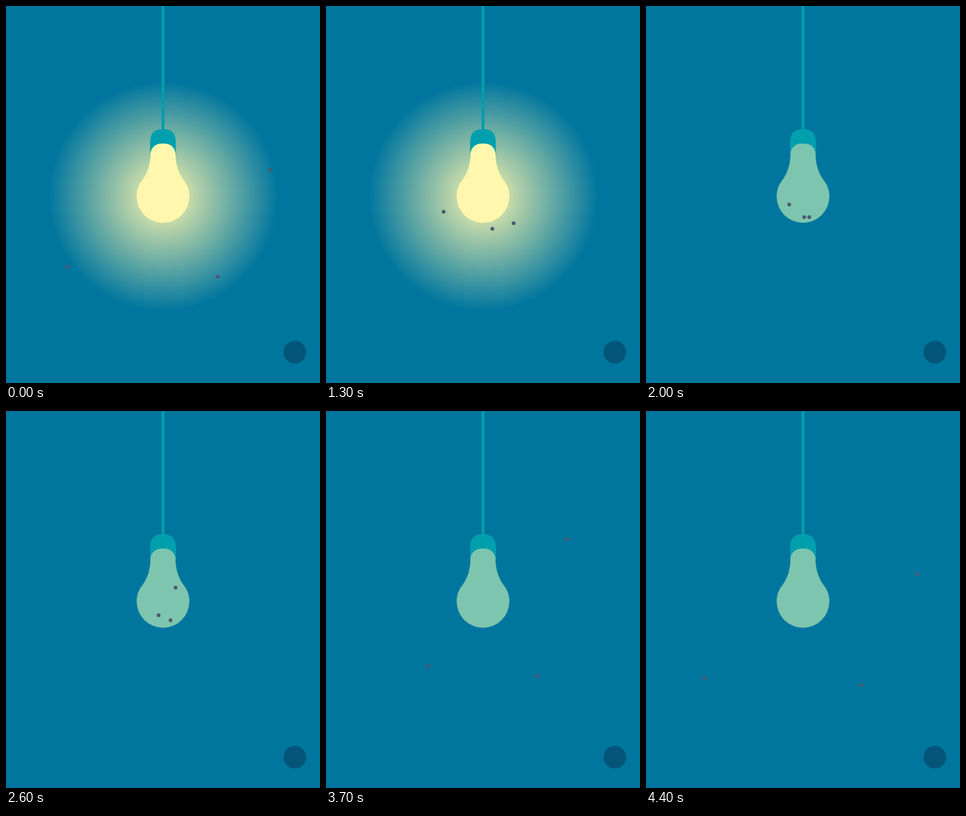
These frames come from a looping animation (500 px wide and 600 px high, 4500 ms). An HTML page:

```html
<!DOCTYPE html>
<html lang="en">
<head>
<meta charset="utf-8">
<title>Flies and a light bulb</title>
<style>
  html, body { margin: 0; width: 100%; height: 100%; overflow: hidden; background: #00769e; }
  svg { display: block; width: 100%; height: 100%; }
</style>
</head>
<body>
<svg viewBox="0 0 500 600">
  <defs>
    <radialGradient id="halo">
      <stop offset="0" stop-color="#fff7ad"/>
      <stop offset="1" stop-color="#fff7ad" stop-opacity="0"/>
    </radialGradient>
  </defs>
  <rect width="500" height="600" fill="#00769e"/>
  <circle id="glow" cx="250.5" cy="303" r="183" fill="url(#halo)"/>
  <g fill="#009fae">
    <rect x="247.7" width="4.6" height="199"/>
    <path d="M229.5 236V218C229.5 202 236 196 250 196S270.5 202 270.5 218V236Z"/>
  </g>
  <path id="bulb" d="M230 236A17 17 0 0 1 247 219H253A17 17 0 0 1 270 236C270 252 275 266 282 276C288 283 292 292 292 303A42 42 0 0 1 208 303C208 292 212 283 218 276C225 266 230 252 230 236Z"/>
  <g id="flies" fill="#4d5870"></g>
  <circle cx="460" cy="551" r="18" fill="#03557a"/>
</svg>
<script>
const STEP = 100, STEPS = 45, LIGHTS_OUT = 20;

// Each fly loops smoothly: far away, approach, touch, darkness, crawl, leave, turn back
const keySteps = [0, 7, 19, 20, 26, 37, 44];
const routes = [
  "98,415 148,352 225,311 228,316 243,325 163,406 93,425",
  "337,431 280,369 256,346 252,336 262,333 336,422 342,436",
  "421,261 340,327 264,352 260,336 270,281 384,204 432,260"
].map(route => route.split(" ").map(point => point.split(",").map(Number)));

const byId = id => document.getElementById(id);
const glow = byId("glow"), bulb = byId("bulb");

const flies = routes.map(route => {
  const dot = document.createElementNS("http://www.w3.org/2000/svg", "circle");
  dot.setAttribute("r", 3);
  byId("flies").appendChild(dot);
  return { dot, route };
});

// Key i of a closed route as [step, x, y], for any integer i
function keyAt(route, i) {
  const n = route.length, k = (i + n) % n;
  return [keySteps[k] + Math.floor(i / n) * STEPS, ...route[k]];
}

// Cubic Hermite curve with slopes taken from the neighbouring keys
function positionAt(route, step) {
  const i = keySteps.findLastIndex(key => key <= step);
  const [a, b, c, d] = [-1, 0, 1, 2].map(k => keyAt(route, i + k));
  const span = c[0] - b[0], u = (step - b[0]) / span, v = 1 - u;
  return [1, 2].map(k => {
    const from = (c[k] - a[k]) / (c[0] - a[0]) * span;
    const to = (d[k] - b[k]) / (d[0] - b[0]) * span;
    return v * v * ((1 + 2 * u) * b[k] + u * from) + u * u * ((3 - 2 * u) * c[k] - v * to);
  });
}

function draw(ms) {
  const step = Math.floor(ms / STEP) % STEPS;
  const lit = step < LIGHTS_OUT;
  glow.setAttribute("visibility", lit ? "visible" : "hidden");
  bulb.setAttribute("fill", lit ? "#fff7ad" : "#7dc5ae");
  for (const { dot, route } of flies) {
    const [x, y] = positionAt(route, step);
    dot.setAttribute("cx", x);
    dot.setAttribute("cy", y);
  }
}

const start = performance.now();
function tick() {
  draw(performance.now() - start);
  requestAnimationFrame(tick);
}
tick();
</script>
</body>
</html>
```
